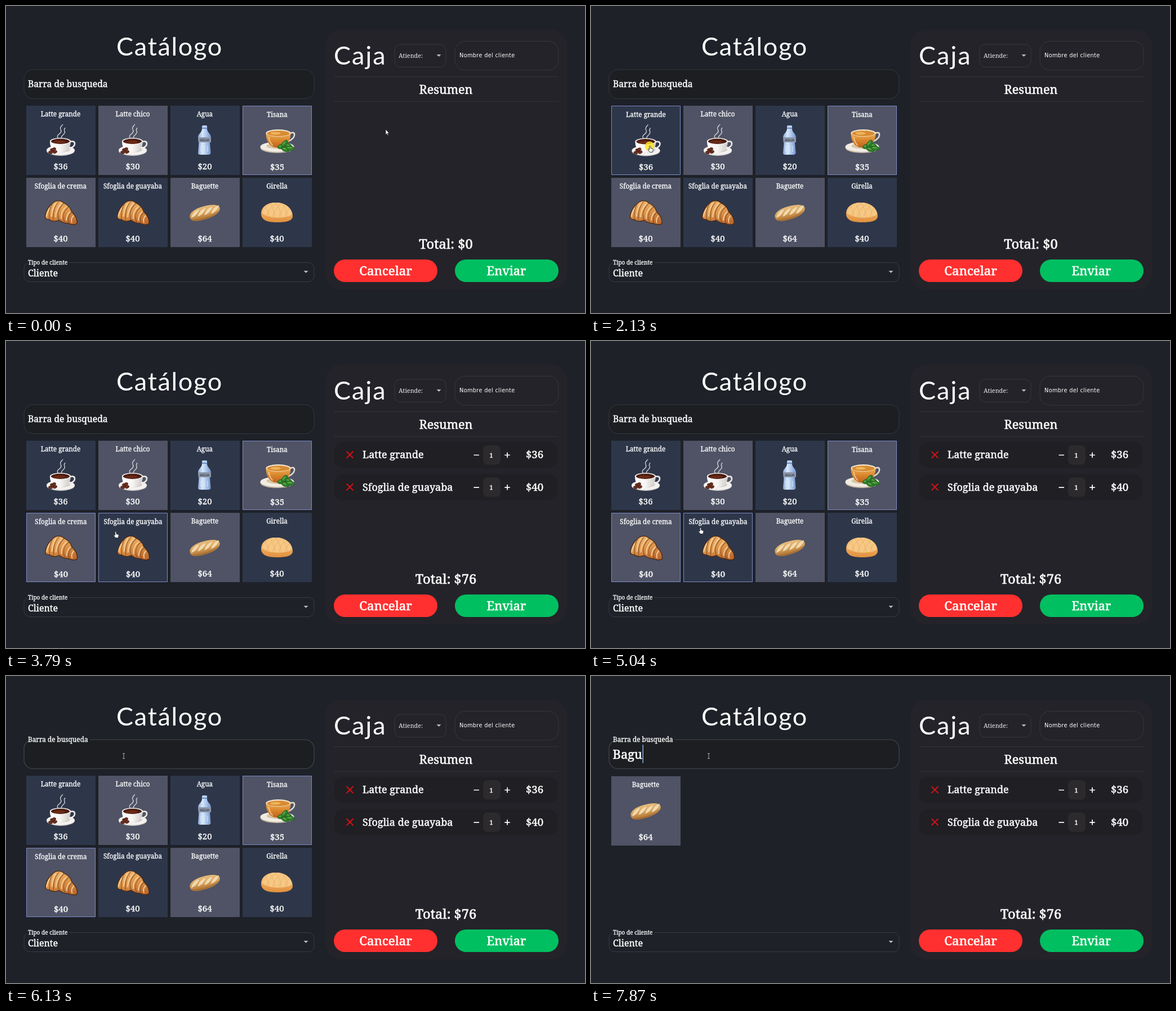
Write an HTML page with a canvas that moves like this. It is 1028 px wide and 545 px high and loops after 8000 ms.

```html
<!DOCTYPE html>
<html lang="es">
<head>
<meta charset="utf-8">
<title>Catálogo</title>
<style>
html, body { margin: 0; width: 100%; height: 100%; overflow: hidden; background: #1e2128; }
canvas { display: block; width: 100vw; height: 100vh; }
</style>
</head>
<body>
<canvas id="stage" width="1028" height="545"></canvas>
<script>
const ctx = document.getElementById('stage').getContext('2d');
const LOOP = 8000, TAU = Math.PI * 2;
const SERIF = '"Noto Serif", serif', SANS = 'Lato, sans-serif';
const PAGE = '#1e2128', NAVY = '#2e374a', SLATE = '#4f5365';

const clamp = v => Math.max(0, Math.min(1, v));
const ramp = (t, a, b) => { const k = clamp((t - a) / (b - a)); return k * k * (3 - 2 * k); };
const mix = (a, b, k) => a + (b - a) * k;

// ---------- drawing helpers ----------
// "ink" thickens the regular weight to a medium one, relative to the size.
function text(str, x, y, size, { align = 'left', family = SERIF, color = '#fff', gap = 0, ink = .028 } = {}) {
  ctx.font = `400 ${size}px ${family}`;
  ctx.textAlign = align;
  ctx.letterSpacing = gap + 'px';
  ctx.fillStyle = ctx.strokeStyle = color;
  ctx.fillText(str, x, y);
  if (ink) {
    ctx.lineJoin = 'round';
    ctx.lineWidth = size * ink;
    ctx.strokeText(str, x, y);
  }
  ctx.letterSpacing = '0px';
}
function paint(fill, stroke, width = 1) {
  if (fill) { ctx.fillStyle = fill; ctx.fill(); }
  if (stroke) { ctx.strokeStyle = stroke; ctx.lineWidth = width; ctx.stroke(); }
}
function box(x, y, w, h, r, fill, stroke, width) {
  ctx.beginPath();
  ctx.roundRect(x, y, w, h, r);
  paint(fill, stroke, width);
}
function oval(x, y, rx, ry, fill, stroke, width, turn = 0) {
  ctx.beginPath();
  ctx.ellipse(x, y, rx, ry, turn, 0, TAU);
  paint(fill, stroke, width);
}
function shape(d, fill, stroke, width) {
  const p = new Path2D(d);
  if (fill) { ctx.fillStyle = fill; ctx.fill(p); }
  if (stroke) { ctx.strokeStyle = stroke; ctx.lineWidth = width || 1; ctx.stroke(p); }
}
function fade(x0, y0, x1, y1, ...colors) {
  const g = ctx.createLinearGradient(x0, y0, x1, y1);
  colors.forEach((c, i) => g.addColorStop(i / (colors.length - 1), c));
  return g;
}
function caretDown(x, y) {
  shape(`M${x - 4} ${y - 2}h8l-4 4z`, '#b9babd');
}

// ---------- products, relative to the card corner ----------
function coffee() {
  oval(61, 80, 25, 9, '#c9c7c6');
  oval(61, 79, 25, 8.5, '#f4f2f0');
  oval(61, 78, 17, 5, '#d2cfcd');
  shape('M78 64C88 60 90 73 76 76', null, '#ece9e7', 2.6);
  shape('M42 63C42 76 48 83 59 83C71 83 79 76 79 63Z', fade(42, 0, 79, 0, '#fff', '#f7f5f3', '#cdc9c6'));
  oval(60.5, 63, 18.5, 6, '#f8f6f4');
  oval(60.5, 63.3, 16.5, 4.7, '#4a1b10');
  oval(59, 64.3, 11, 2.6, '#6a2a17');
  shape('M57 58C50 51 66 50 61 42C59 38 63 36 65 33M63 58C59 53 71 51 68 45C66 42 69 40 69 39', null, '#d8d9de', 1.3);
  for (const [x, y, a] of [[46, 79, .5], [51, 82, -.4], [43, 83, .2], [49, 77, -.3]]) {
    oval(x, y, 3.7, 2.5, '#6b2f20', '#3d170f', .7, a);
  }
}
function bottle() {
  const glass = fade(49, 0, 72, 0, '#88a7d5', '#d9e8fa', '#a5c2ec', '#7795c6');
  shape('M56 41h9C65 48 72 49 72 57L70 66L71.5 84Q71 87 67 87H53Q49 87 49 84L50.5 66L49 57C49 49 56 48 56 41Z', glass);
  box(56, 35, 9, 5, 1.5, '#b8d0f0');
  box(55.5, 39, 10, 2, 1, '#6f8dbf');
  ctx.fillStyle = '#8c96a8';
  ctx.fillRect(49.5, 56, 22.5, 9);
  text('AGUA', 60.7, 62.8, 6, { align: 'center', family: SANS, color: '#353c4b' });
  shape('M54 71v11M60 70v14M66 71v11', null, 'rgba(240,248,255,.55)', 1.4);
}
function tea() {
  oval(61, 74, 30, 9.5, '#c5b9a6');
  oval(61, 72.5, 30, 9, '#f1ece2');
  oval(61, 71, 19, 5, '#d8c5a5');
  shape('M83 49C95 42 95 58 80 63', null, '#e6ddd0', 2.5);
  shape('M41 48C41 63 48 74 62 74C76 74 85 63 85 48Z', fade(0, 47, 0, 75, '#f0b65a', '#d9852d', '#b9601b'));
  oval(63, 48, 22, 6.5, '#f4e7d0');
  oval(63, 48.7, 20, 5, '#d98b32');
  oval(58, 48.5, 9, 2.5, '#edb45b');
  shape('M46 55C47 63 50 67 53 70', null, 'rgba(255,235,190,.65)', 2);
  for (const [x, y, a] of [[69, 72, -.2], [80, 70, .4], [74, 67, -.9], [76, 77, .25], [84, 75, .1]]) {
    oval(x, y, 7.5, 4, '#2f7d2b', '#1d571f', .7, a);
    oval(x - 1, y - 1, 4.5, 1.2, '#5fa844', null, 0, a);
  }
}
function croissant() {
  const body = 'M33.5 69C34 61 40 50 47 45C53 39 62 40 67 45C74 48 79 55 81 61C87 66 91 74 90 81C87 84 80 84 75 81C69 81 63 79 58 75C52 78 46 78 41 74C37 74 33 73 33.5 69Z';
  shape(body, fade(50, 40, 60, 84, '#f0b873', '#de974c', '#bd6a2f'), '#4a2712', 1.3);
  shape('M47 45C41 54 40 64 41 74M58 42C49 52 47 64 48 76M67 45C57 54 54 65 58 75M75 52C66 59 64 69 68 79M81 61C75 66 73 74 76 81', null, '#8a4f22', 1.1);
  shape('M41 54C38 59 36 64 36 69M52 45C47 53 45 61 45 69M63 45C55 53 52 61 52 70M71 51C64 57 61 64 62 73M78 60C72 65 71 70 71 76M84 67C80 71 79 75 81 80', null, '#f7d09a', 1.8);
}
function baguette() {
  ctx.save();
  ctx.translate(61.5, 62);
  ctx.rotate(-.2);
  shape('M-28 4C-29 -4 -20 -9 -7 -11C8 -13 24 -12 27 -5C29 3 18 9 3 11C-12 13 -26 13 -28 4Z', fade(0, -11, 0, 12, '#e6bb7b', '#d6a05a', '#a86d30'));
  for (let x = -19; x <= 17; x += 12) {
    shape(`M${x - 7} 4C${x - 4} -3 ${x + 3} -8 ${x + 10} -8C${x + 7} -3 ${x + 1} 3 ${x - 7} 4Z`, '#f0dab0');
  }
  shape('M-24 8C-10 12 12 9 24 2', null, 'rgba(120,70,25,.35)', 1.2);
  ctx.restore();
}
function girella() {
  shape('M33 64C33 50 46 43 60 44C77 44 89 55 89 68C89 77 76 79 61 79C44 79 33 75 33 64Z', fade(0, 43, 0, 79, '#f5bd73', '#f0aa5c', '#e0913f'));
  const top = 'M34 62C35 50 47 44 60 44C76 44 87 54 88 65C78 73 44 73 34 62Z';
  shape(top, '#f6c885');
  ctx.save();
  ctx.clip(new Path2D(top));
  for (let i = 0; i < 5; i++) {
    const x = 36 + i * 11;
    shape(`M${x} 44Q${x + 10} 54 ${x + 11} 74M${x + 14} 44Q${x - 2} 54 ${x - 6} 74`, null, '#ebb067', 1);
  }
  ctx.restore();
}

const products = [
  ['Latte grande', 36, NAVY, coffee], ['Latte chico', 30, SLATE, coffee],
  ['Agua', 20, NAVY, bottle], ['Tisana', 35, SLATE, tea],
  ['Sfoglia de crema', 40, SLATE, croissant], ['Sfoglia de guayaba', 40, NAVY, croissant],
  ['Baguette', 64, SLATE, baguette], ['Girella', 40, NAVY, girella]
];

function card(product, slot, hover, drop = 0) {
  const [name, price, color, art] = product;
  ctx.save();
  ctx.translate(Math.round(35.6 + (slot % 4) * 128.2), 177 + Math.floor(slot / 4) * 128 + drop);
  ctx.fillStyle = color;
  ctx.fillRect(0, 0, 123, 123);
  if (hover) {
    ctx.strokeStyle = `rgba(122,138,198,${hover})`;
    ctx.lineWidth = 1;
    ctx.strokeRect(.5, .5, 122, 122);
  }
  const dx = hover * .5;
  text(name, 61 + dx, 18.6 + hover, 11.7, { align: 'center' });
  ctx.save();
  ctx.translate(dx, hover * .5);
  art();
  ctx.restore();
  text('$' + price, 61 + dx, 113 + hover * .5, 14.9, { align: 'center' });
  ctx.restore();
}

function cards(t) {
  if (t >= 6420) { card(products[6], 0, 0, 1); return; }
  const hover = [
    ramp(t, 1310, 1540) - ramp(t, 2560, 2860), 0, 0, 1,
    ramp(t, 2650, 3170), ramp(t, 2900, 3210) - ramp(t, 5080, 5380), 0, 0
  ];
  products.forEach((p, i) => card(p, i, hover[i]));
}

// ---------- left column ----------
function search(t) {
  const focus = ramp(t, 5590, 5800);
  const lit = ramp(t, 5310, 5330) - ramp(t, 5590, 5640);
  const shade = [28, 30, 34].map((c, i) => Math.round(mix(c, [34, 38, 43][i], lit)));
  box(32, 113, 515, 51.5, 16, `rgb(${shade})`, focus ? '#43464b' : '#35383e', 1 + focus * .2);
  if (focus) {
    ctx.fillStyle = PAGE;
    ctx.fillRect(37, 111, 112 * focus, 3.2);
  }
  text('Barra de busqueda', 39, mix(144, 117, focus), mix(15.7, 11.8, focus));

  const keys = [5600, 6390, 6750, 7060, 7870];
  const count = keys.filter(k => t >= k).length;
  if (!count) return;
  const typed = 'Bagu'.slice(0, count - 1);
  text(typed, 38.5, 147, 22);
  if (t - keys[count - 1] < 530) {
    ctx.fillStyle = '#90bdf0';
    ctx.fillRect(39 + ctx.measureText(typed).width, 122, 1.4, 32.5);
  }
}

function clientType() {
  box(32, 455.5, 515, 34, 10, null, '#383b40');
  ctx.fillStyle = PAGE;
  ctx.fillRect(37, 454, 75, 3);
  text('Tipo de cliente', 39, 458.5, 10.1);
  text('Cliente', 39, 479.5, 16);
  caretDown(532.5, 472);
}

// ---------- right column ----------
function row(y, name, price) {
  box(583, y, 396, 46.5, 16, '#201f24');
  shape(`M604.5 ${y + 17}l12 12m0 -12l-12 12`, null, '#d31214', 2);
  text(name, 633, y + 29.3, 18);
  box(847, y + 6, 31, 34.5, 8, '#2c2a2d');
  text('1', 861.5, y + 27.5, 11.5, { align: 'center' });
  shape(`M830.5 ${y + 23.5}h9.5M885.3 ${y + 23.5}h9.5m-4.75 -4.75v9.5`, null, '#fff', 1.7);
  text('$' + price, 938.5, y + 29.3, 18.6, { align: 'center' });
}

function register(t) {
  box(567, 42, 429, 461, 28, '#242329');
  text('Caja', 582, 104, 45, { family: SANS, gap: 2, ink: 0 });
  box(690, 68, 91, 40.5, 10, null, '#38373c');
  text('Atiende:', 697, 92, 10.8, { color: '#ececee', ink: 0 });
  caretDown(768.5, 88);
  box(797, 62.5, 184, 51.5, 18, null, '#38373c');
  text('Nombre del cliente', 805, 91.3, 9.8, { family: '"DejaVu Sans", sans-serif', gap: .3, ink: 0 });
  ctx.fillStyle = '#333238';
  ctx.fillRect(582, 125, 399, 1);
  ctx.fillRect(582, 169, 399, 1);
  text('Resumen', 781, 155.5, 21.6, { align: 'center' });

  const first = t >= 2170, second = t >= 3710;
  if (first) row(179, 'Latte grande', 36);
  if (second) row(236.3, 'Sfoglia de guayaba', 40);
  text('Total: $' + (second ? 76 : first ? 36 : 0), 781, 430.5, 23.7, { align: 'center' });

  box(582, 450, 184, 40, 20, '#ff302f');
  box(797, 450, 184, 40, 20, '#00bf60');
  text('Cancelar', 674, 477.5, 22.3, { align: 'center' });
  text('Enviar', 888.5, 477.5, 21.8, { align: 'center' });
}

// ---------- pointer ----------
// start, end, then the four points of a cubic curve
const moves = [
  [500, 1250, 674, 219, 330, -80, -150, 170, 246, 280],
  [1310, 1540, 246, 280, 200, 275, 140, 250, 104, 248],
  [2370, 3040, 104, 248, 108, 300, 150, 340, 194, 338],
  [4990, 5450, 194, 338, 190, 270, 212, 200, 209, 142]
];
function pointerAt(t) {
  let m = moves[0];
  for (const next of moves) if (t >= next[0]) m = next;
  const k = ramp(t, m[0], m[1]), j = 1 - k;
  const curve = i => j * j * j * m[i] + 3 * j * j * k * m[i + 2] + 3 * j * k * k * m[i + 4] + k * k * k * m[i + 6];
  return [curve(2), curve(3)];
}
function pointer(t) {
  const [x, y] = pointerAt(t);
  const clicked = (t >= 2130 && t < 2200) || (t >= 3670 && t < 3780);
  if (clicked) oval(x, y + 1, 8.5, 8.5, 'rgba(250,228,40,.85)');
  ctx.save();
  ctx.translate(x, y);
  ctx.lineJoin = 'round';
  const inside = x > 35 && x < 544;
  if (inside && y > 177 && y < 428) {
    shape('M-.5 6V1.2Q.7 -.5 1.9 1.2V4.5L5.4 5.5Q6.4 6 6.2 7.5L5.3 11.5H.5L-2.7 7.5Q-2.7 5.8 -.5 7Z', '#fff', '#22242a', .9);
  } else if (inside && y > 113 && y < 165) {
    shape('M-2 -4.5H2M-2 4.5H2M0 -4.5V4.5', null, '#a9abae', 1);
  } else {
    shape('M0 0V9.5L2.1 7.5L3.6 11L5 10.4L3.6 7H6.5Z', '#fff', '#14151a', .7);
  }
  ctx.restore();
}

function draw(t) {
  ctx.fillStyle = PAGE;
  ctx.fillRect(0, 0, 1028, 545);
  text('Catálogo', 290.5, 88, 45, { align: 'center', family: SANS, gap: 1.7, ink: 0 });
  search(t);
  cards(t);
  clientType();
  register(t);
  pointer(t);
}

const start = performance.now();
function tick() {
  draw((performance.now() - start) % LOOP);
  requestAnimationFrame(tick);
}
tick();
</script>
</body>
</html>
```
